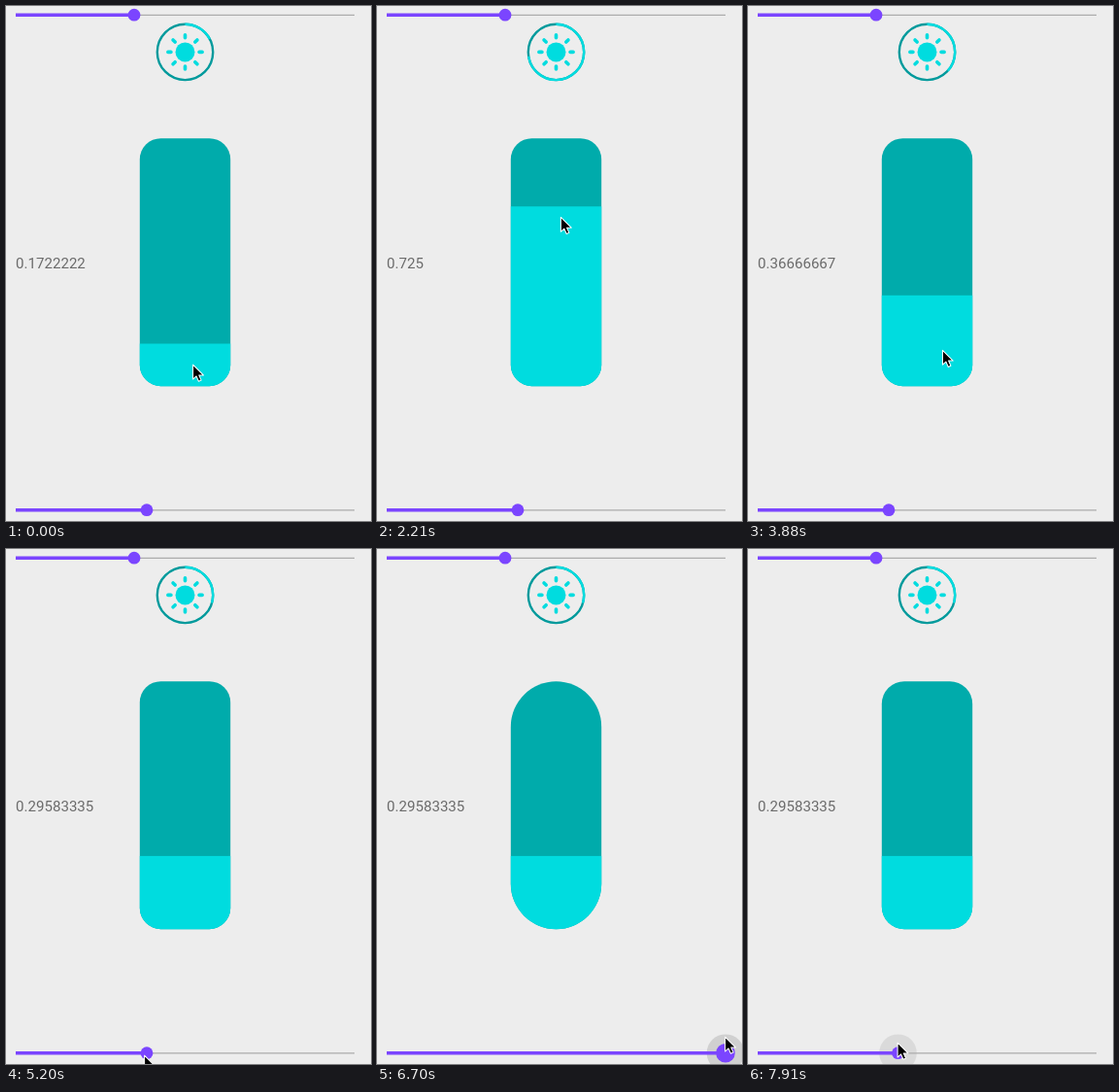
Write an HTML page that moves like this. It is 376 by 530 pixels and loops after 8 s.

```html
<!DOCTYPE html>
<html lang="en">
<head>
<meta charset="utf-8">
<title>Brightness control</title>
<style>
  html, body { margin: 0; width: 100%; height: 100%; overflow: hidden; background: #ededed; }
  svg { display: block; width: 376px; height: 530px; }
  text { font: 15.1px Roboto, Arial, sans-serif; fill: #6b6b6b; }
  .rail { stroke: #acacac; stroke-width: 1.2; }
  .fill { stroke: #7b45ff; stroke-width: 3.4; }
  .knob { fill: #7b45ff; }
  .ring { fill: none; stroke-width: 2.4; }
  .bright { fill: #00dcdf; }
  .dark { fill: #00abab; }
</style>
</head>
<body>
<svg viewBox="0 0 376 530">
  <defs>
    <clipPath id="clip"><rect id="shape" x="137.8" y="136.2" width="93.4" height="255"/></clipPath>
  </defs>

  <path class="rail" d="M10 9.4H359"/>
  <path class="fill" d="M10 9.2H132"/>
  <circle class="knob" cx="132" cy="9.2" r="6.4"/>

  <g transform="translate(184.5 47.4)">
    <circle class="ring" r="28.7" stroke="#009a9c"/>
    <circle class="ring" id="arc" r="28.7" stroke="#00dcdf" pathLength="720" transform="rotate(-90)"/>
    <circle class="bright" r="10"/>
    <g id="rays" stroke="#00dcdf" stroke-width="3.6" stroke-linecap="round"></g>
  </g>

  <g clip-path="url(#clip)">
    <rect class="dark" x="137" y="136" width="95" height="256"/>
    <rect class="bright" id="level" x="137" width="95" height="256"/>
  </g>
  <text id="label" x="10" y="270"></text>

  <circle id="ripple" cy="518.7" fill="#000"/>
  <path class="rail" d="M10 518.8H359"/>
  <path class="fill" id="track"/>
  <circle class="knob" id="knob" cy="518.7"/>

  <g id="cursor">
    <path d="M0 0V16L3.7 12.6L6.3 18.4L9.1 17.1L6.6 11.5H11.6Z" transform="translate(.6 1.2) scale(.93)"
          fill="#000" stroke="#fff" stroke-width="1.1" stroke-linejoin="round"/>
  </g>
</svg>
<script>
  const LOOP = 8000, TICKS = 91, UNITS = 720;
  const $ = id => document.getElementById(id);
  const set = (id, attrs) => {
    for (const key in attrs) $(id).setAttribute(key, attrs[key]);
  };

  const smooth = p => p * p * (3 - 2 * p);

  // Shortest decimal that reads back as the same 32-bit float
  function floatText(v) {
    if (v % 1 === 0) return v.toFixed(1);
    for (let p = 1; p < 10; p++) {
      const s = String(Number(v.toPrecision(p)));
      if (Math.fround(s) === v) return s;
    }
    return String(v);
  }

  // The value is measured from the top of the bar, in single precision
  const valueOf = n => Math.fround(1 - Math.fround((UNITS - n) / UNITS));

  // Drag up to full, then back down; the bar trails the pointer
  function levelAt(ramp) {
    const up = ramp(11, 29) ** 1.607;
    const down = 1 - (1 - ramp(32, 47) ** 2.2) ** 2.425;
    return Math.round(124 + 596 * up - 507 * down);
  }

  const knobAt = ramp => 145 + 214 * ramp(59, 74) - 204.5 * ramp(76, 90) ** 0.87;

  function overBar(ramp) {
    const up = ramp(11, 29) ** 1.26, down = smooth(ramp(31, 45)), leave = ramp(48, 52);
    return [
      192 - 6.5 * ramp(0, 2) + 4.5 * up + 10 * down - 32 * leave,
      368 + 5 * ramp(0, 2) - 3 * ramp(3, 5) - 211 * up + 197 * down + 198 * leave
    ];
  }

  function overSlider(ramp) {
    return [
      knobAt(ramp) - 4 + ramp(57, 59) + 2 * ramp(59, 68),
      522 - 2 * ramp(57, 59) - 19 * ramp(59, 68) + 6 * ramp(76, 90)
    ];
  }

  for (let a = 0; a < 360; a += 45) {
    $('rays').insertAdjacentHTML('beforeend', `<path d="M0 -14.6V-17.6" transform="rotate(${a})"/>`);
  }

  function draw(tick) {
    const ramp = (from, to) => Math.min(1, Math.max(0, (tick - from) / (to - from)));
    const n = levelAt(ramp), x = knobAt(ramp);
    const press = ramp(59, 62), release = ramp(86, 90);
    const [cx, cy] = tick < 56 ? overBar(ramp) : overSlider(ramp);

    set('level', { y: 391.5 - 255.5 * n / UNITS });
    set('arc', { 'stroke-dasharray': n >= UNITS ? 'none' : `${n} ${UNITS}` });
    $('label').textContent = floatText(valueOf(n));
    set('shape', { rx: Math.min(46.7, 56 * (x - 10) / 349) });
    set('track', { d: `M10 518.7H${x}` });
    set('knob', { cx: x, r: 6.4 + 3.4 * (press - release) });
    set('ripple', { cx: x, r: 19.3 * Math.sqrt(press), opacity: 0.12 * press - 0.04 * release });
    set('cursor', { transform: `translate(${cx} ${cy})` });
  }

  const start = performance.now();
  function frame() {
    const t = (performance.now() - start) % LOOP;
    draw(Math.min(TICKS - 1, Math.floor(t * TICKS / LOOP + 0.05)));
    requestAnimationFrame(frame);
  }
  frame();
</script>
</body>
</html>
```
